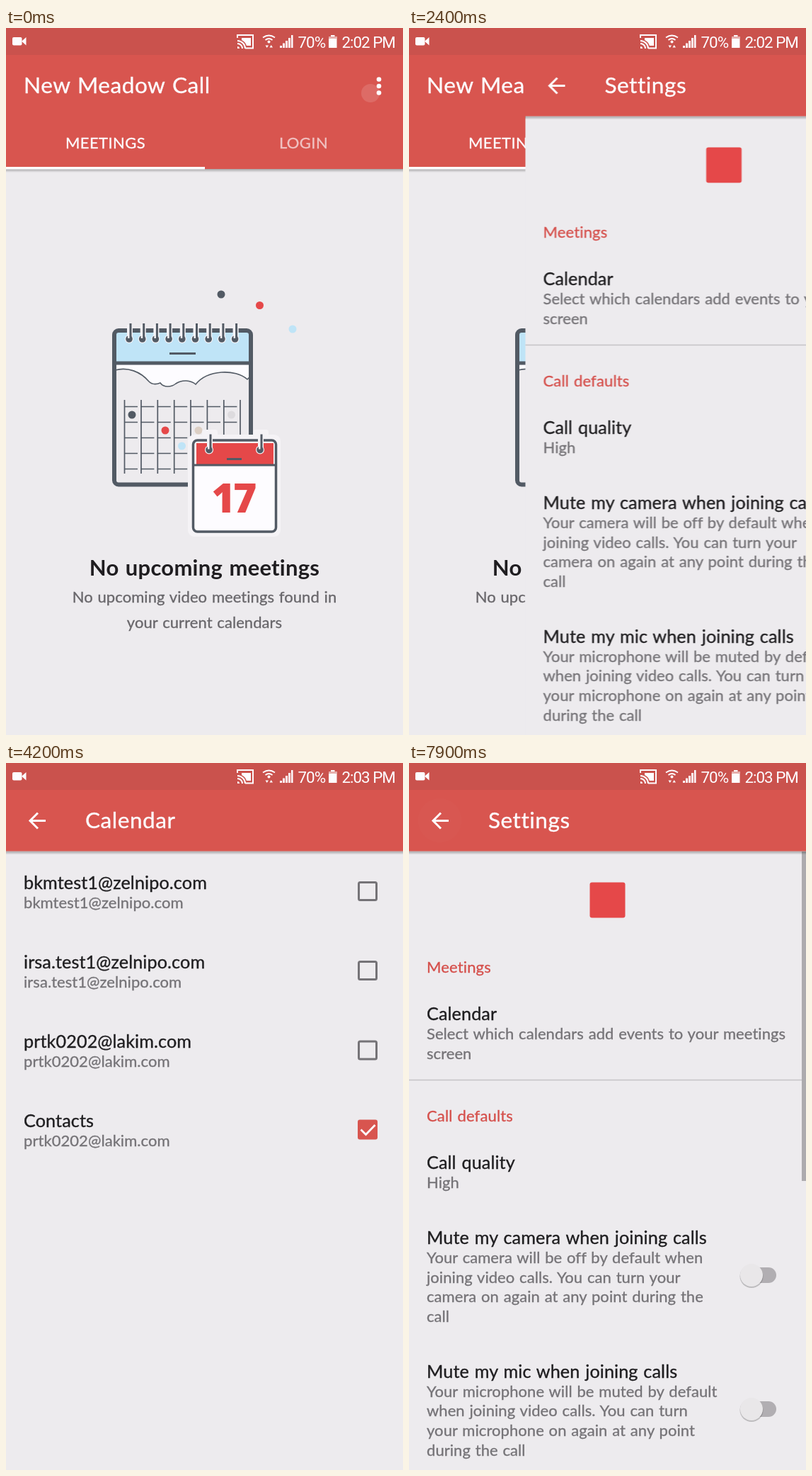
These frames come from a looping animation (561 px wide and 998 px high, 8 s). An HTML page:

```html
<!DOCTYPE html>
<html lang="en">
<head>
<meta charset="utf-8">
<title>Meeting app settings</title>
<style>
html, body { margin: 0; width: 100%; height: 100%; overflow: hidden; background: #edebee; }
svg { display: block; width: 561px; height: 998px; overflow: hidden; }
text { font-family: Lato, "Open Sans", sans-serif; font-size: 22px; letter-spacing: .06px; word-spacing: .05em; stroke-width: .35px; }
.mid { text-anchor: middle; }
.title { font-size: 31.6px; letter-spacing: .5px; fill: #fdfcff; stroke: #fdfcff; }
.item { font-size: 25.2px; letter-spacing: .1px; fill: #1f1e20; stroke: #1f1e20; }
.sub { fill: #757377; stroke: #757377; }
.head { fill: #d5504c; stroke: #d5504c; letter-spacing: .15px; }
.note { fill: #69676b; stroke: #69676b; }
.big { font-size: 31px; font-weight: 700; letter-spacing: .25px; fill: #1f1d20; }
.day { font-family: "Open Sans", Inter, sans-serif; font-size: 57px; font-weight: 800; letter-spacing: -3px; fill: #e54849; }
.tab { letter-spacing: .4px; fill: #fdfcff; stroke: #fdfcff; }
.status { font-family: Roboto, "Liberation Sans", sans-serif; font-size: 22.4px; letter-spacing: -1px; word-spacing: 0; fill: #fdfcff; }
.ink { stroke: #525a64; fill: none; }
.line { stroke: #fdfcff; fill: none; }

.anim { animation: 8s linear infinite; }
.step { animation: 8s step-end infinite; }

/* screens */
.sheet { animation-name: sheet; }
@keyframes sheet {
  0% { transform: translateX(561px); }
  26.84% { transform: translateX(561px); animation-timing-function: cubic-bezier(.37,0,.63,1); }
  31.84%, 100% { transform: none; }
}
.prefs { animation-name: prefs; }
@keyframes prefs {
  0% { transform: none; opacity: 1; }
  43.52% { transform: none; opacity: 1; animation-timing-function: cubic-bezier(.333,.667,.667,1); }
  47.27% { transform: translateX(-280.5px); opacity: 0; }
  81.96% { transform: translateX(-280.5px); opacity: 0; animation-timing-function: cubic-bezier(.333,.667,.667,1); }
  85.71%, 100% { transform: none; opacity: 1; }
}
.list { animation-name: list; }
@keyframes list {
  0% { transform: translateX(280.5px); opacity: 0; }
  43.52% { transform: translateX(280.5px); opacity: 0; animation-timing-function: cubic-bezier(.333,.667,.667,1); }
  47.27% { transform: none; opacity: 1; }
  81.96% { transform: none; opacity: 1; animation-timing-function: cubic-bezier(.333,.667,.667,1); }
  85.71%, 100% { transform: translateX(280.5px); opacity: 0; }
}

/* hard swaps */
.in-prefs { animation-name: inPrefs; }
@keyframes inPrefs { 0% { opacity: 1; } 43.52% { opacity: 0; } 81.96%, 100% { opacity: 1; } }
.in-list { animation-name: inList; }
@keyframes inList { 0% { opacity: 0; } 43.52% { opacity: 1; } 81.96%, 100% { opacity: 0; } }
.early { animation-name: early; }
@keyframes early { 0% { opacity: 1; } 41.25%, 100% { opacity: 0; } }
.late { animation-name: late; }
@keyframes late { 0% { opacity: 0; } 41.25%, 100% { opacity: 1; } }

/* overflow menu */
.more { animation-name: more; }
@keyframes more {
  0% { transform: translate(515px,92px) scale(13); opacity: .13; }
  3.75% { transform: translate(527px,82px) scale(37); opacity: .13; }
  6.25%, 100% { transform: translate(527px,82px) scale(37); opacity: 0; }
}
.menu { animation-name: menu; filter: drop-shadow(0 3px 5px rgba(0,0,0,.35)); }
@keyframes menu {
  0%, 1.5% { opacity: 0; }
  5%, 23.75% { opacity: 1; }
  26%, 100% { opacity: 0; }
}
.pick { animation-name: pick; }
@keyframes pick {
  0%, 16% { transform: translate(450px,96px) scale(10); opacity: 0; }
  17.5% { transform: translate(450px,96px) scale(40); opacity: .1; }
  22.5% { transform: translate(466px,96px) scale(110); opacity: .1; }
  26%, 100% { transform: translate(466px,96px) scale(110); opacity: 0; }
}

/* row presses */
.row-shade { animation-name: rowShade; }
@keyframes rowShade {
  0%, 40.6% { opacity: 0; }
  42.5%, 47.27% { opacity: .055; }
  47.3%, 100% { opacity: 0; }
}
.row-spot { animation-name: rowSpot; }
@keyframes rowSpot {
  0%, 40.6% { transform: translate(135px,393px) scale(20); opacity: 0; }
  42% { transform: translate(135px,393px) scale(48); opacity: .045; }
  45% { transform: translate(135px,393px) scale(95); opacity: .045; }
  47.27% { transform: translate(135px,393px) scale(130); opacity: .045; }
  47.3%, 100% { transform: translate(135px,393px) scale(130); opacity: 0; }
}
.tick-shade { animation-name: tickShade; }
@keyframes tickShade {
  0%, 64.5% { opacity: 0; }
  66.25%, 70% { opacity: .03; }
  75.5%, 100% { opacity: 0; }
}
.tick-spot { animation-name: tickSpot; }
@keyframes tickSpot {
  0%, 64.5% { transform: translate(510px,405px) scale(20); opacity: 0; }
  66.25% { transform: translate(510px,405px) scale(130); opacity: .035; }
  70.5% { transform: translate(510px,405px) scale(560); opacity: .025; }
  75.5%, 100% { transform: translate(510px,405px) scale(560); opacity: 0; }
}
.tick { animation-name: tick; }
@keyframes tick { 0%, 66.9% { opacity: 0; } 68.7%, 100% { opacity: 1; } }

.back { animation-name: back; }
@keyframes back {
  0%, 81% { transform: translate(43.5px,81px) scale(12); opacity: 0; }
  83.75% { transform: translate(43.5px,81px) scale(31); opacity: .07; }
  85% { transform: translate(43.5px,81px) scale(31); opacity: .05; }
  88.5% { transform: translate(43.5px,81px) scale(31); opacity: 0; }
  94.5% { transform: translate(43.5px,81px) scale(31); opacity: 0; }
  96.8% { transform: translate(43.5px,81px) scale(31); opacity: .05; }
  98.75% { transform: translate(43.5px,81px) scale(31); opacity: .015; }
  100% { transform: translate(43.5px,81px) scale(31); opacity: 0; }
}
</style>
</head>
<body>
<svg viewBox="0 0 561 998" xmlns="http://www.w3.org/2000/svg">
  <defs>
    <linearGradient id="shade" x2="0" y2="1">
      <stop offset="0" stop-color="#000" stop-opacity=".3"/>
      <stop offset="1" stop-color="#000" stop-opacity="0"/>
    </linearGradient>
    <clipPath id="rowClip"><rect y="314" width="561" height="133"/></clipPath>
    <clipPath id="tickClip"><rect y="349" width="561" height="112"/></clipPath>
    <clipPath id="menuClip"><rect x="379" y="58" width="174" height="76"/></clipPath>
    <g id="ring">
      <path d="M0 419V436" stroke="#f5f3f6" stroke-width="8"/>
      <circle cx="-1" cy="439" r="6" fill="#f5f3f6"/>
      <circle cx="-1" cy="439" r="4.8" fill="#525a64"/>
      <path d="M-1.5 430V438" stroke="#f5f3f6" stroke-width="3"/>
      <path class="ink" d="M1 417V439" stroke-width="3"/>
    </g>
    <g id="switch">
      <rect x="475" y="-11" width="44" height="22" rx="11" fill="#b1aeb2"/>
      <circle cx="484" cy="1.5" r="16.5" fill="#000" opacity=".2"/>
      <circle cx="484" r="16" fill="#e9e7e9"/>
    </g>
    <rect id="box" x="498.5" y="-12.5" width="25" height="25" rx="2" fill="none" stroke="#757377" stroke-width="3"/>
    <g id="checked">
      <rect x="497" y="-14" width="28" height="28" rx="3" fill="#d8554f"/>
      <path class="line" d="M501.5 0l7 7 13-13.5" stroke-width="2.8"/>
    </g>
  </defs>

  <rect width="561" height="998" fill="#edebee"/>

  <!-- meetings -->
  <g>
    <rect y="199" width="561" height="5" fill="url(#shade)"/>
    <rect y="37" width="561" height="162" fill="#d8554f"/>
    <text class="title" x="25" y="92">New Meadow Call</text>
    <circle class="anim more" r="1" fill="#fff"/>
    <g fill="#fdfcff">
      <circle cx="527" cy="72.5" r="3.3"/><circle cx="527" cy="82" r="3.3"/><circle cx="527" cy="91.5" r="3.3"/>
      <rect y="196" width="281" height="3.5"/>
    </g>
    <text class="tab mid" x="140.5" y="170">MEETINGS</text>
    <text class="tab mid" x="420.5" y="170" opacity=".65">LOGIN</text>

    <!-- wall calendar -->
    <rect x="156" y="430" width="190" height="43" fill="#bfe4f7"/>
    <path d="M154 483C172 478 190 485 202 499C207 504 213 503 218 501C223 508 234 507 240 502C249 496 261 497 268 503C285 482 324 481 341 496L346 491V474H154Z" fill="#fdfcff"/>
    <path class="ink" d="M154 483C172 478 190 485 202 499C207 504 213 503 218 501C223 508 234 507 240 502C249 496 261 497 268 503C285 482 324 481 341 496L346 491" stroke-width="1.6"/>
    <rect class="ink" x="153" y="427" width="193" height="217.5" rx="6" stroke-width="6"/>
    <path class="ink" d="M153 473H346" stroke-width="5"/>
    <path class="ink" d="M231 459.5H268" stroke-width="3"/>
    <use href="#ring" x="175"/><use href="#ring" x="193.7"/><use href="#ring" x="212.4"/>
    <use href="#ring" x="231.1"/><use href="#ring" x="249.8"/><use href="#ring" x="268.5"/>
    <use href="#ring" x="287.2"/><use href="#ring" x="305.9"/><use href="#ring" x="324.6"/>
    <path class="ink" d="M167.5 525V629M191 525V629M214.3 525V629M237.7 525V629M261 525V629M284.4 525V629M307.8 525V629M331 525V629" stroke-width="1.7"/>
    <path class="ink" d="M167 534.5H329M167 556.5H329M167 578.5H329M167 600.5H329M167 622.5H329" stroke-width="1.7" stroke-dasharray="19 4.4"/>
    <g fill="#525a64"><circle cx="178" cy="546" r="5.5"/><circle cx="304" cy="376" r="5.5"/></g>
    <g fill="#e54849"><circle cx="225" cy="568" r="5.5"/><circle cx="358.5" cy="391.5" r="5.5"/></g>
    <g fill="#bfe4f7"><circle cx="248.5" cy="590" r="5.5"/><circle cx="405" cy="425" r="5.5"/></g>
    <circle cx="272" cy="568" r="5.5" fill="#dccfc4"/>
    <circle cx="318.5" cy="546" r="5.5" fill="#dddbde"/>

    <!-- day calendar -->
    <g fill="#f5f3f6">
      <rect x="257" y="574" width="131" height="144" rx="9"/>
      <rect x="277" y="567" width="22" height="14" rx="3"/><rect x="349" y="567" width="22" height="14" rx="3"/>
    </g>
    <rect class="ink" x="264.5" y="582" width="117" height="129" rx="6" stroke-width="3.5" style="fill:#fdfcff"/>
    <rect x="269" y="586" width="109" height="30" fill="#e54849"/>
    <path class="ink" d="M265 617H381M312 608.5H333" stroke-width="3"/>
    <use href="#ring" x="288" y="156.5"/><use href="#ring" x="360" y="156.5"/>
    <text class="day mid" x="321" y="684">17</text>

    <text class="big mid" x="280.5" y="773">No upcoming meetings</text>
    <text class="note mid" x="280.5" y="811">No upcoming video meetings found in</text>
    <text class="note mid" x="280.5" y="847">your current calendars</text>
  </g>

  <!-- overflow menu -->
  <g class="anim menu">
    <rect x="379" y="46" width="174" height="100" rx="3" fill="#fdfcff"/>
    <g clip-path="url(#menuClip)"><circle class="anim pick" r="1"/></g>
    <text class="item" x="404" y="105">Settings</text>
  </g>

  <!-- settings and calendar -->
  <g class="anim sheet">
    <rect y="37" width="561" height="961" fill="#edebee"/>

    <g class="anim prefs">
      <rect class="anim row-shade" y="314" width="561" height="133"/>
      <g clip-path="url(#rowClip)"><circle class="anim row-spot" r="1"/></g>
      <rect x="255.5" y="168.5" width="50" height="50" rx="3" fill="#e54849"/>
      <text class="head" x="25" y="296">Meetings</text>
      <text class="item" x="25" y="362.5">Calendar</text>
      <text class="sub" x="25" y="390">Select which calendars add events to your meetings</text>
      <text class="sub" x="25" y="417.5">screen</text>
      <path d="M0 447.5H561" stroke="#c5c3c6" stroke-width="1.4"/>
      <text class="head" x="25" y="506">Call defaults</text>
      <text class="item" x="25" y="572.5">Call quality</text>
      <text class="sub" x="25" y="599.5">High</text>
      <text class="item" x="25" y="678.5">Mute my camera when joining calls</text>
      <g class="sub">
        <text x="25" y="706">Your camera will be off by default when</text>
        <text x="25" y="733.5">joining video calls. You can turn your</text>
        <text x="25" y="761">camera on again at any point during the</text>
        <text x="25" y="788.5">call</text>
      </g>
      <use href="#switch" y="723"/>
      <text class="item" x="25" y="867.5">Mute my mic when joining calls</text>
      <g class="sub">
        <text x="25" y="894.5">Your microphone will be muted by default</text>
        <text x="25" y="922">when joining video calls. You can turn</text>
        <text x="25" y="950">your microphone on again at any point</text>
        <text x="25" y="977.5">during the call</text>
      </g>
      <use href="#switch" y="912"/>
      <rect x="555" y="125" width="6" height="465" fill="#adabae"/>
    </g>

    <g class="anim list">
      <g fill="#30402a">
        <rect class="anim tick-shade" y="349" width="561" height="112"/>
        <g clip-path="url(#tickClip)"><circle class="anim tick-spot" r="1"/></g>
      </g>
      <text class="item" x="25" y="177.5">bkmtest1@zelnipo.com</text>
      <text class="sub" x="25" y="204.5">bkmtest1@zelnipo.com</text>
      <text class="item" x="25" y="289.5">irsa.test1@zelnipo.com</text>
      <text class="sub" x="25" y="316.5">irsa.test1@zelnipo.com</text>
      <text class="item" x="25" y="402">prtk0202@lakim.com</text>
      <text class="sub" x="25" y="429">prtk0202@lakim.com</text>
      <text class="item" x="25" y="514">Contacts</text>
      <text class="sub" x="25" y="541">prtk0202@lakim.com</text>
      <use href="#box" y="181"/><use href="#box" y="293"/><use href="#box" y="405.5"/>
      <use class="anim tick" href="#checked" y="405.5"/>
      <use href="#checked" y="517.5"/>
    </g>

    <rect y="124.5" width="561" height="5" fill="url(#shade)"/>
    <rect y="37" width="561" height="87.5" fill="#d8554f"/>
    <circle class="anim back" r="1" fill="#fff"/>
    <path class="line" d="M56 81.5H34M45 70.5L34 81.5L45 92.5" stroke-width="3"/>
    <text class="title step in-prefs" x="112" y="92">Settings</text>
    <text class="title step in-list" x="112" y="92">Calendar</text>
  </g>

  <!-- status bar -->
  <rect width="561" height="38" fill="#ca524d"/>
  <g fill="#fdfcff">
    <rect x="9" y="13" width="13.5" height="11.5" rx="2"/>
    <path d="M22 18.7L28.5 13V24.5Z"/>
    <path d="M327 29V26A3 3 0 0 1 330 29Z"/>
    <path d="M333 14H346V25H340A13 13 0 0 0 333 17Z"/>
    <path d="M387 28V25H390V28ZM391 28V21.5H394V28ZM395 28V18H398V28ZM399 28V14H402V28ZM403 28V10H405.5V28Z"/>
    <path d="M459 10H464.5V12H467.5V28H456V12H459Z"/>
    <circle cx="371.5" cy="19.5" r="2"/>
    <path d="M366.5 24.5H371L368.7 28ZM372.5 27.5H377L374.7 24Z"/>
  </g>
  <path d="M456 12H467.5V15H456Z" fill="#e6aeac"/>
  <g class="line" stroke-width="2">
    <path d="M327 14V10H349V28.5H338M327 22A7 7 0 0 1 334 29M327 18A11 11 0 0 1 338 29"/>
    <path d="M363 13.5Q371.5 7.5 380 13.5M366.5 17Q371.5 13 376.5 17" stroke-width="1.8"/>
  </g>
  <text class="status" x="412.5" y="28">70%</text>
  <text class="status step early" x="474.5" y="28">2:02 PM</text>
  <text class="status step late" x="474.5" y="28">2:03 PM</text>
</svg>
</body>
</html>
```
